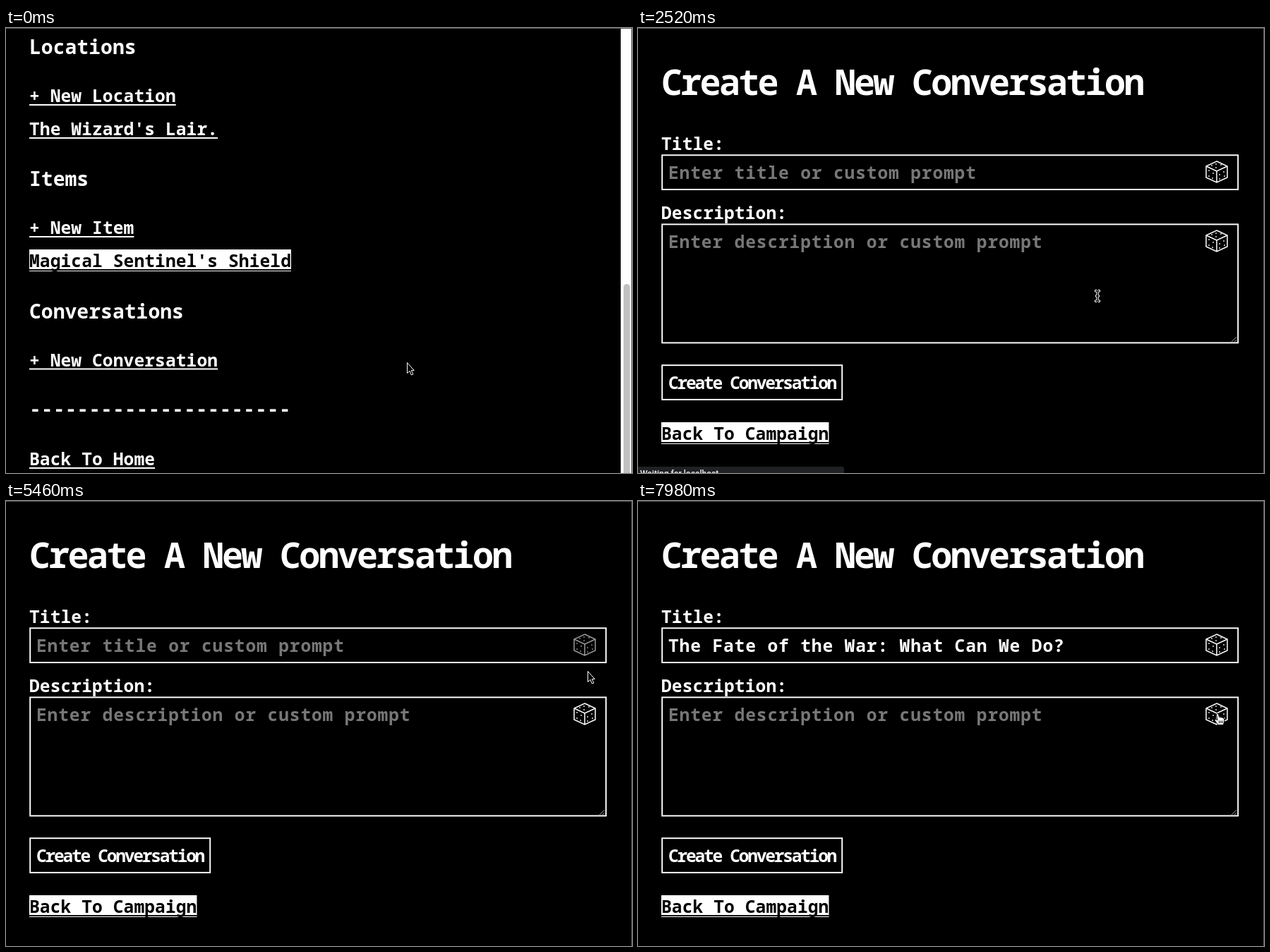
An HTML page for the animation above (8000 ms loop, 887 by 631 pixels).

```html
<!DOCTYPE html>
<html lang="en">
<head>
<meta charset="utf-8">
<title>New conversation</title>
<style>
  html, body { margin: 0; width: 100%; height: 100%; overflow: hidden; background: #000; }
  svg { display: block; }
  text { font-family: "Noto Sans Mono", "DejaVu Sans Mono", monospace; font-weight: 600; font-stretch: 75%; white-space: pre; }
  .bold { font-weight: 700; }
  .status { font: 500 12px Roboto, "Open Sans", sans-serif; fill: #f4f4f4; }
  .frame { fill: none; stroke: #fff; stroke-width: 1.95; }
  .die { fill: none; stroke: #fff; stroke-width: 1.5; }
  .pips { stroke-width: 1.6; stroke-linecap: square; }
  .dark { fill: #000; stroke: #fff; stroke-width: 1; }
  .light { fill: #fff; stroke: #000; stroke-width: 1; }
</style>
</head>
<body>
<svg id="stage" width="887" height="631" viewBox="0 0 887 631"></svg>
<script>
const LOOP = 8000, STEP = 70, LEFT = 33, LINK_PITCH = 14.84;
const stage = document.getElementById('stage');

// Monospaced text on a baseline; pitch is the distance between characters.
function label(str, x, y, { size = 24.5, pitch = LINK_PITCH, fill = '#fff', cls = '' } = {}) {
  return `<text class="${cls}" x="${x}" y="${y}" font-size="${size}" data-pitch="${pitch}" fill="${fill}">${str}</text>`;
}

// Letter spacing fills what the font's own advance leaves of the pitch.
function spaceLetters() {
  for (const el of stage.querySelectorAll('[data-pitch]')) {
    const advance = el.getComputedTextLength() / el.textContent.length;
    el.style.letterSpacing = (el.dataset.pitch - advance).toFixed(3) + 'px';
  }
}

const rect = (x, y, w, h, fill) => `<rect x="${x}" y="${y}" width="${w}" height="${h}" fill="${fill}"/>`;
const frame = (x, y, w, h) => `<rect class="frame" x="${x + 1}" y="${y + 1}" width="${w - 2}" height="${h - 2}"/>`;
const group = (id, body) => `<g id="${id}">${body}</g>`;
const heading = (str, y) => label(str, LEFT, y, { size: 28, pitch: 16.84, cls: 'bold' });
const entry = (str, y, fill = '#fff') => label(str, 43, y, { pitch: 15.6, fill });

function link(str, y, active = false) {
  const width = str.length * LINK_PITCH;
  const ink = active ? '#000' : '#fff';
  return (active ? rect(LEFT, y - 25.5, width, 31, '#fff') : '')
    + label(str, LEFT, y - 0.5, { fill: ink })
    + rect(LEFT, y + 2.5, width, 2, ink);
}

// A link with a plain and a highlighted version.
const toggleLink = (id, str, y) =>
  group(id + 'Off', link(str, y)) + group(id + 'On', link(str, y, true));

function die(id, y) {
  const pips = [[15, 5], [9, 7], [22, 6], [15, 10], [5, 14], [10, 25], [5, 22], [11, 18], [20, 20], [26, 16], [20, 26], [27, 22]]
    .map(([px, py]) => `M${px} ${py}h.1`).join('');
  return `<g id="${id}" class="die" transform="translate(804 ${y})">
    <path d="M16 1L31 8V24L16 31L1 24V8ZM1 8L16 15L31 8M16 15V31"/>
    <path class="pips" d="${pips}"/></g>`;
}

const listPage = heading('Locations', 37)
  + link('+ New Location', 105.5)
  + link("The Wizard's Lair.", 152.5)
  + heading('Items', 224)
  + link('+ New Item', 292.5)
  + toggleLink('item', "Magical Sentinel's Shield", 339.5)
  + heading('Conversations', 411.5)
  + toggleLink('talk', '+ New Conversation', 480)
  + heading('-'.repeat(22), 549.5)
  + link('Back To Home', 620.5)
  + rect(871, 1, 15, 630, '#fff')
  + '<rect x="875" y="363" width="9" height="290" rx="4.5" fill="#c1c1c1"/>';

const formPage = label('Create A New Conversation', LEFT, 95, { size: 50, pitch: 27.3, cls: 'bold' })
  + label('Title:', LEFT, 172.5)
  + frame(33.2, 179.3, 818, 50.7)
  + group('titleHint', entry('Enter title or custom prompt', 214, '#777'))
  + group('titleText', entry('The Fate of the War: What Can We Do?', 214))
  + die('titleDie', 188)
  + label('Description:', LEFT, 270.5)
  + frame(33.2, 277.4, 818, 170)
  + entry('Enter description or custom prompt', 312, '#777')
  + die('bodyDie', 286)
  + '<path d="M841 445L848 438M845 445L848 442" stroke="#999"/>'
  + frame(33.2, 477.2, 257, 50.7)
  + label('Create Conversation', 43, 512, { pitch: 12.48 })
  + link('Back To Campaign', 584.5, true);

const status = '<rect x="-4" y="622" width="296" height="20" rx="3" fill="#202124"/>'
  + '<text class="status" x="3" y="635.5">Waiting for localhost...</text>';

const cursors = `
  <path id="arrow" class="dark" d="M.5 .5V15.5L4 12.3L6.3 18L8.8 17L6.4 11.5H10.2Z"/>
  <path id="beam" class="dark" d="M-3.5 -8.5H-1L0 -7.5L1 -8.5H3.5V-6H1.2V-1.2H2.5V1.2H1.2V6H3.5V8.5H1L0 7.5L-1 8.5H-3.5V6H-1.2V1.2H-2.5V-1.2H-1.2V-6H-3.5Z"/>
  <path id="hand" class="light" d="M-1.5 1Q0 -1 1.5 1L2.5 5.5Q4 4.3 5 6Q6.8 5 7.6 6.8Q9.5 6.2 9.8 8V11L8.5 16.5H1.2L-4 10Q-4 8 -2 8.6L0 10ZM2.5 10.5V14M4.8 10.5V14M7 10.5V14"/>`;

stage.innerHTML = rect(0, 0, 887, 631, '#000')
  + group('list', listPage) + group('form', formPage)
  + '<path d="M0 .5H887M886.5 0V631" stroke="#555"/>'
  + group('status', status) + cursors;
spaceLetters();

// Time, x, y and the cursor shown from that time on.
const path = [
  [0, 568, 474, 'arrow'], [420, 650, 378, 'arrow'],
  [2520, 651, 380, 'beam'], [3780, 651, 380, 'arrow'],
  [3850, 879, 332, 'arrow'], [3920, 873, 318, 'arrow'],
  [4130, 873, 318, 'arrow'], [4340, 830, 222, 'hand'], [4480, 823, 215, 'hand'],
  [5040, 823, 215, 'hand'], [5110, 824, 230, 'arrow'], [5250, 824, 241, 'arrow'],
  [6160, 824, 241, 'arrow'], [6300, 824, 238, 'arrow'],
  [6440, 824, 238, 'arrow'], [6650, 842, 262, 'arrow'],
  [6790, 832, 290, 'hand'], [7210, 821, 301, 'hand'], [LOOP, 821, 301, 'hand']
];

const $ = id => document.getElementById(id);
const show = (id, on) => { $(id).style.display = on ? '' : 'none'; };
const ramp = (t, from, to) => Math.min(1, Math.max(0, (t - from) / (to - from)));
const mix = (a, b, k) => a + (b - a) * k;

function placeCursor(t) {
  const i = path.findIndex((key, n) => t < path[n + 1][0]);
  const [t0, x0, y0, kind] = path[i], [t1, x1, y1] = path[i + 1];
  const k = ramp(t, t0, t1), eased = k * k * (3 - 2 * k);
  // Still stretches keep their place until the next pose begins.
  const still = t1 - t0 > 1000;
  const x = still ? x0 : mix(x0, x1, eased), y = still ? y0 : mix(y0, y1, eased);
  for (const id of ['arrow', 'beam', 'hand']) show(id, id === kind);
  $(kind).setAttribute('transform', `translate(${x.toFixed(1)} ${y.toFixed(1)})`);
}

function draw(now) {
  const t = Math.floor((now % LOOP) / STEP) * STEP;
  const onForm = t >= 2520, filled = t >= 5880, moved = t >= 840;
  show('list', !onForm);
  show('form', onForm);
  show('itemOn', !moved);
  show('itemOff', moved);
  show('talkOn', moved);
  show('talkOff', !moved);
  show('titleHint', !filled);
  show('titleText', filled);
  show('status', t >= 2450 && t < 2940);
  $('status').style.opacity = 1 - ramp(t, 2730, 2940);
  $('titleDie').style.opacity = filled ? 1 : mix(1, 0.6, ramp(t, 4410, 4620));
  placeCursor(t);
}

const start = performance.now();
function tick() {
  draw(performance.now() - start);
  requestAnimationFrame(tick);
}
tick();
</script>
</body>
</html>
```
